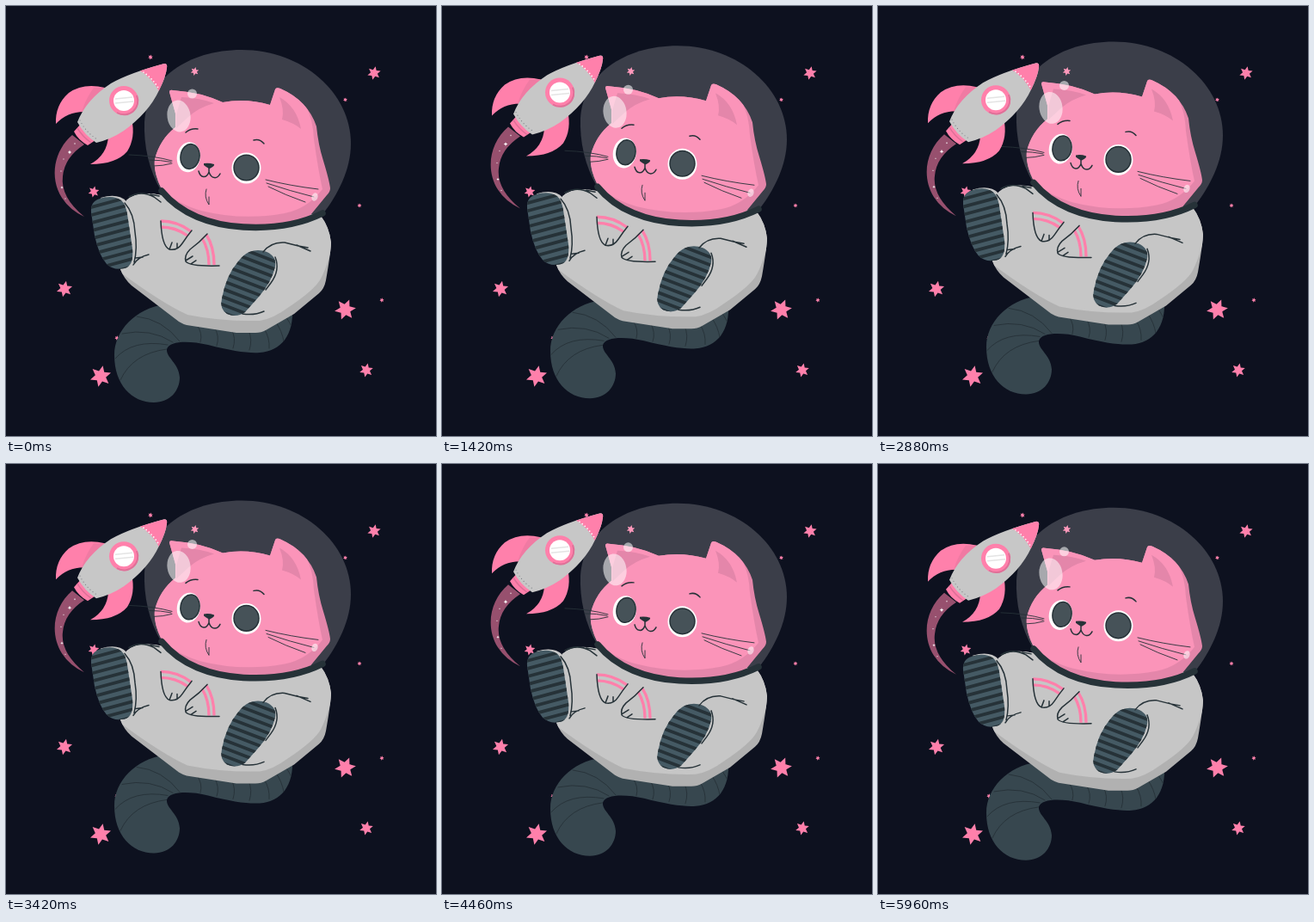
Write an HTML page that moves like this. It is 500 by 500 pixels and loops after 6 s.

```html
<!DOCTYPE html>
<html lang="en">
<head>
<meta charset="utf-8">
<title>Space cat</title>
<style>
  html, body { margin: 0; width: 100%; height: 100%; overflow: hidden; background: #0d111f; }
  svg { display: block; width: 100vw; height: 100vh; }
  .pink { fill: #ff80ab; }
  .ink { fill: none; stroke: #263238; stroke-width: 1.5; stroke-linecap: round; stroke-linejoin: round; }
  .fine { stroke-width: .9; }
  .collar { stroke-width: 7.5; }
  .cuff { fill: none; stroke: #ff80ab; stroke-width: 3.3; }
  .dots { fill: none; stroke-linecap: round; stroke-width: 1.7; }
</style>
</head>
<body>
<svg viewBox="0 0 500 500">
  <defs>
    <clipPath id="tailClip"><use href="#tailShape"/></clipPath>
    <clipPath id="leftSoleClip"><use href="#leftSole"/></clipPath>
    <clipPath id="rightSoleClip"><use href="#rightSole"/></clipPath>
    <clipPath id="headClip"><use href="#headShape"/></clipPath>
    <clipPath id="bodyClip"><use href="#bodyShape"/></clipPath>
    <clipPath id="hullClip"><use href="#hullShape"/></clipPath>
  </defs>

  <g id="stars" class="pink"></g>

  <g id="cat">
    <!-- tail -->
    <path id="tailShape" fill="#37474f" d="M184 347C151 352 126 377 126 406C126 440 146 461 172 461C191 461 202 447 202 432C201 415 186 409 187 399C190 389 213 389 235 394C262 401 282 404 295 403C320 401 335 383 333 350Z"/>
    <g clip-path="url(#tailClip)" class="ink fine">
      <path d="M133 435Q147 404 187 399M127 410Q147 387 188 394M135 381Q168 374 194 391M152 361Q182 364 202 390"/>
      <path d="M222 371Q229 380 226 391M242 373Q249 384 245 395M262 376Q268 386 264 398M282 377Q287 388 283 400M300 375Q307 386 306 398M314 368Q321 378 323 390M324 360Q331 368 334 378"/>
    </g>

    <!-- suit -->
    <path id="bodyShape" fill="#b1b1b1" d="M140 226Q153 214 181 220L366 244Q376 257 378 275Q378 284 372 319Q370 329 364 334L335 358L302 377Q297 380 290 380L268 380L210 371Q206 370 201 367L146 325Q137 317 133 306Z"/>
    <path fill="#c6c6c6" clip-path="url(#bodyClip)" d="M120 200H380V278Q373 304 366 317Q359 330 329 350Q310 364 295 366Q250 367 211 359Q182 346 132 309Z"/>

    <!-- helmet and head -->
    <path fill="#fff" fill-opacity=".19" d="M181 216C166 191 160 162 161 135C164 85 211 51 274 51C345 51 401 101 401 160C401 190 386 219 369 241C320 266 220 260 181 216Z"/>
    <path id="headShape" fill="#e486aa" d="M190 100Q190 97 194 98Q226 100 252 112Q279 107 307 115L313 97Q314 94 319 96Q351 110 361 140Q363 161 369 180Q376 203 377 212Q377 216 373 220L350 248Q310 259 255 254Q212 245 181 213Q171 193 173 178Q179 155 197 141L197 125Z"/>
    <path fill="#fb94b9" clip-path="url(#headClip)" d="M170 90H300Q340 92 349 117Q357 132 358 155Q363 191 368 213Q350 236 324 241Q275 250 227 238Q200 231 170 207Z"/>
    <path fill="#e486aa" d="M204 106Q226 107 242 113Q224 118 212 129L198 142L198 126Z"/>
    <path fill="#e486aa" d="M318 106Q338 117 343 143Q335 136 321 132Q324 121 318 106Z"/>

    <path class="ink collar" d="M181 215C203 242 238 255 276 257Q330 260 368 241"/>

    <!-- face -->
    <g fill="#fff">
      <ellipse cx="212.3" cy="175.7" rx="13.5" ry="17.5" transform="rotate(9 212.3 175.7)"/>
      <ellipse cx="279.5" cy="188.5" rx="17" ry="18"/>
    </g>
    <g class="ink" style="fill:#465258">
      <ellipse cx="214" cy="175" rx="11" ry="14.5" transform="rotate(9 214 175)"/>
      <ellipse cx="279.5" cy="188" rx="14.5" ry="14.8"/>
    </g>
    <g class="ink">
      <path d="M209 147Q215 142 223 143M288 156Q295 154 300 160"/>
      <path d="M236 187V193C233 201 226 200 224 192M236 193C239 202 246 201 249 195"/>
      <path class="fine" d="M233 213Q230 222 236 231L236 222"/>
      <path class="fine" d="M143 173Q172 174 193 180M166 179Q180 179 192 181.5M172 186Q182 186 193 183"/>
      <path class="fine" d="M302 202Q330 209 363 213M303 206Q330 215 358 222M305 210Q325 220 348 228"/>
    </g>
    <path fill="#263238" d="M230 183Q236 182 242 184Q243 186 237 189Q235 189 230 185Z"/>
    <g fill="#fff" fill-opacity=".55">
      <ellipse cx="201" cy="128" rx="13.5" ry="18.5" transform="rotate(-8 201 128)"/>
      <circle cx="216.5" cy="102" r="5.5"/>
      <ellipse cx="359" cy="222" rx="3.5" ry="4.8" transform="rotate(20 359 222)"/>
    </g>

    <!-- paws -->
    <path class="cuff" d="M180 250Q199 250 215 262M180 257Q197 257 211 267M233 266Q242 280 242 301M228 270Q236 283 236 301"/>
    <path class="ink" d="M180 250Q181 279 190 283Q199 285 205 276Q211 267 216 261M190 283L193 275M199 282L199 276"/>
    <path class="ink" d="M234 265Q225 275 214 283Q207 290 209 297Q214 303 248 302M209 296L217 291M215 300L221 296"/>

    <!-- left foot -->
    <path fill="#c6c6c6" d="M110 223Q130 217 140 227Q151 245 152 280Q152 302 138 306Z"/>
    <path id="leftSole" fill="#455a64" d="M99 240Q98 227 109 224Q124 219 134 226Q139 230 141 242L147 282Q149 302 138 305Q125 308 117 300Q108 290 103 267Z"/>
    <g clip-path="url(#leftSoleClip)"><g id="leftTread" fill="#263238" transform="translate(123 264) rotate(-15)"></g></g>
    <path class="ink" d="M138 229Q149 241 150 263Q153 282 149 298M148 301Q153 292 166 289M151 293L159 292M143 222Q157 214 172 222L180 228M168 219L178 221"/>

    <!-- right foot -->
    <path fill="#c6c6c6" d="M296 284Q316 289 317 305Q315 325 287 351L271 360Z"/>
    <path id="rightSole" fill="#455a64" d="M283 286Q293 282 303 286Q315 291 313 303Q309 321 294 338L278 356Q268 363 257 358Q248 352 251 340Q256 313 270 297Q276 289 283 286Z"/>
    <g clip-path="url(#rightSoleClip)"><g id="rightTread" fill="#263238" transform="translate(282 322) rotate(21)"></g></g>
    <path class="ink" d="M299 286Q308 274 324 275L340 279L351 281M338 278L354 285M313 292Q319 307 308 322L302 330M275 358Q289 360 300 355"/>
  </g>

  <g id="rocket">
    <path class="pink" fill-opacity=".57" d="M77 150C56 168 50 199 65 223Q74 237 91 245Q63 222 66 198Q68 176 91 161Z"/>
    <path id="sparkles" fill="#fff" d=""/>
    <path class="pink" d="M115 95Q90 89 73 101Q57 115 58 137Q72 122 93 123Z"/>
    <path class="pink" d="M146 131Q151 153 141 169Q128 184 98 184Q118 173 119 151Z"/>
    <path fill="#f07aa3" d="M115 95L102 95Q93 107 88 123L94 123Z"/>
    <path class="pink" d="M87 137L79 146Q84 156 95 162L104 156Z"/>
    <path fill="none" stroke="#df7098" stroke-width="1.5" d="M83 142Q89 152 99 159"/>
    <path id="hullShape" fill="#c7c7c7" d="M184 67Q188 67 187 72Q186 82 178 98Q166 124 137 145Q122 155 105 159Q91 150 83 135Q93 109 122 90Q143 78 184 67Z"/>
    <path class="pink" clip-path="url(#hullClip)" d="M154 74Q170 83 179 101L195 90V60H170Z"/>
    <path class="dots" stroke="#fff" stroke-dasharray="0 4" d="M160 77Q170 84 177 95"/>
    <path class="dots" stroke="#7d8286" style="stroke-width:1.2" stroke-dasharray="0 4" d="M86 133Q93 147 106 155"/>
    <circle class="pink" cx="137" cy="110" r="17"/>
    <path fill="none" stroke="#df7098" stroke-width="2" d="M152 104A16 16 0 0 1 129 124"/>
    <circle cx="137" cy="110" r="12" fill="#fff"/>
    <path fill="none" stroke="#e4e4e4" stroke-width="1.5" d="M127 108L147 106M127 113L148 111"/>
  </g>
</svg>

<script>
  const LOOP = 6000;
  const find = id => document.getElementById(id);

  function starPath(x, y, radius, turn = 12, points = 6, inner = .5) {
    const corners = Array.from({ length: points * 2 }, (_, i) => {
      const angle = (turn - 90 + i * 180 / points) * Math.PI / 180;
      const r = i % 2 ? radius * inner : radius;
      return `${(x + r * Math.cos(angle)).toFixed(2)} ${(y + r * Math.sin(angle)).toFixed(2)}`;
    });
    return `M${corners.join("L")}Z`;
  }

  const stars = [
    [428, 78, 8], [394.5, 109, 2.6], [411, 232, 2.6], [394.5, 353, 12.5, 22],
    [437, 342, 2.7], [419, 423.5, 8.2], [110, 430.5, 12.6], [68, 329, 9.5],
    [102, 216, 6.6], [219.5, 76, 5], [168, 59.5, 3], [129, 386, 2.8]
  ];
  find("stars").innerHTML = `<path d="${stars.map(s => starPath(...s)).join("")}"/>`;

  const sparkles = [[74, 170, 2.4], [80, 160, 1.2], [67, 178, 1], [64, 192, 1], [65, 211, 1.7], [69, 224, 1]];
  find("sparkles").setAttribute("d", sparkles.map(([x, y, r]) => starPath(x, y, r, 0, 4, .4)).join(""));

  function addTread(id, spacing) {
    let bars = "";
    for (let i = -5; i <= 5; i++) bars += `<rect x="-32" y="${i * spacing - 1.9}" width="64" height="3.8"/>`;
    find(id).innerHTML = bars;
  }
  addTread("leftTread", 8.8);
  addTread("rightTread", 8.6);

  // Constant-speed rise and fall, 0 to 1 to 0 over each period.
  const bob = (time, period) => 1 - Math.abs(1 - 2 * (time % period) / period);

  function draw(time) {
    find("cat").setAttribute("transform", `translate(0 ${-10 * bob(time, LOOP)})`);
    find("rocket").setAttribute("transform", `translate(0 ${-10 * bob(time, LOOP / 2)})`);
  }

  const start = performance.now();
  function tick(now) {
    draw(Math.max(0, now - start) % LOOP);
    requestAnimationFrame(tick);
  }
  draw(0);
  requestAnimationFrame(tick);
</script>
</body>
</html>
```
